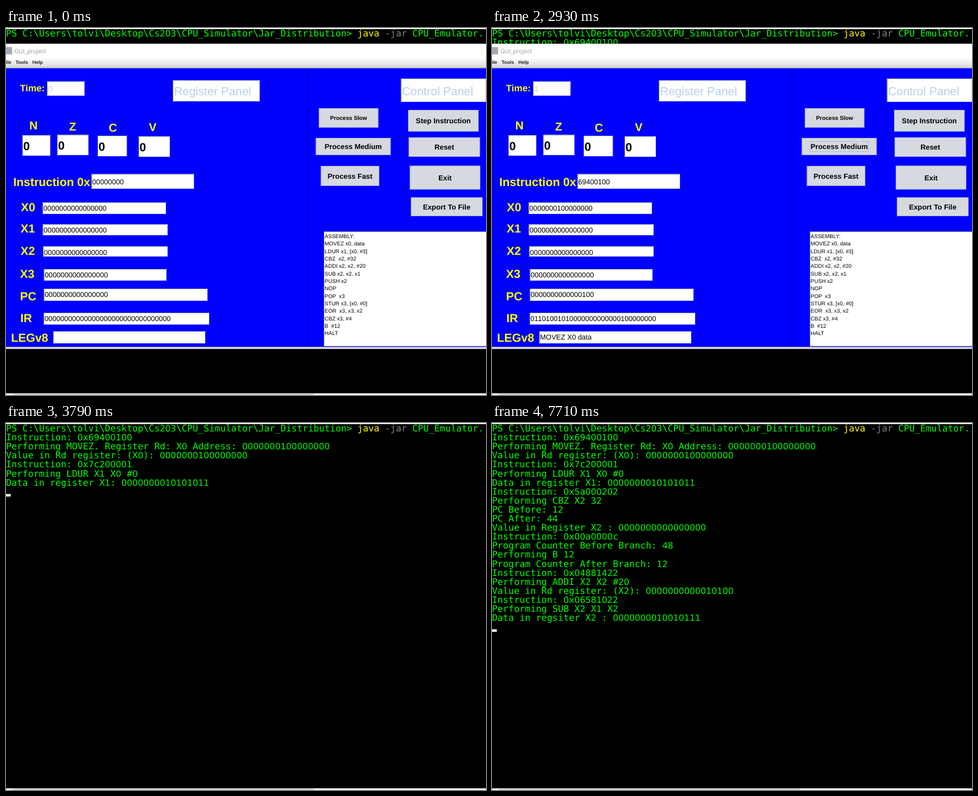
An HTML page that plays this animation: 855x655 px, repeating every 8 s.

```html
<!DOCTYPE html>
<html lang="en">
<head>
<meta charset="utf-8">
<title>CPU simulator</title>
<style>
  html, body { margin: 0; width: 100%; height: 100%; overflow: hidden; background: #000; }
  svg { display: block; width: 855px; height: 655px; }
  text { white-space: pre; text-rendering: geometricPrecision; font-family: "Liberation Sans", Arial, sans-serif; }
  .term text { font: 16.25px "DejaVu Sans Mono", monospace; fill: #00ff00; }
  .term .num { font: 15.37px "DejaVu Sans", sans-serif; }
  .bold { font-weight: bold; }
</style>
</head>
<body>
<svg id="stage" viewBox="0 0 855 655" width="855" height="655"></svg>
<script>
const LOOP = 8000;
const NS = "http://www.w3.org/2000/svg";
const stage = document.getElementById("stage");

function add(parent, tag, attrs = {}, content) {
  const node = document.createElementNS(NS, tag);
  for (const key in attrs) node.setAttribute(key, attrs[key]);
  if (content !== undefined) node.textContent = content;
  parent.appendChild(node);
  return node;
}
const box = (parent, x1, y1, x2, y2, fill) =>
  add(parent, "rect", { x: x1, y: y1, width: x2 - x1, height: y2 - y1, fill });
const label = (parent, x, y, size, content, fill = "#000", cls = "") =>
  add(parent, "text", { x, y, "font-size": size, fill, class: cls }, content);
const show = (node, on) => node.setAttribute("visibility", on ? "visible" : "hidden");

// Terminal
const COL = 9.78, ROW = 16.1;
box(stage, 0, 0, 855, 655, "#f4f4f4");
box(stage, 0, 2, 855, 652, "#000");
box(stage, 12, 653, 548, 655, "#c6c6c6");
const term = add(stage, "g", { class: "term" });

// Digits use the proportional face at the same advance, for an open zero.
function termText(parent, row, col, content, fill) {
  const line = add(parent, "text", { y: 15 + row * ROW });
  for (const run of content.split(/(\d+)/)) {
    if (!run) continue;
    const span = add(line, "tspan", { x: (col * COL).toFixed(2) }, run);
    if (/\d/.test(run)) span.setAttribute("class", "num");
    if (fill) span.style.fill = fill;
    col += run.length;
  }
}
termText(term, 0, 0, "PS C:\\Users\\tolvi\\Desktop\\Cs203\\CPU_Simulator\\Jar_Distribution>");
termText(term, 0, 64, "java", "#ffff00");
termText(term, 0, 69, "-jar", "#808080");
termText(term, 0, 74, "CPU_Emulator.");

const output = [
  [2720, "Instruction: 0x69400100",
    "Performing MOVEZ. Register Rd: X0 Address: 0000000100000000",
    "Value in Rd register: (X0): 0000000100000000"],
  [3790, "Instruction: 0x7c200001",
    "Performing LDUR X1 X0 #0",
    "Data in register X1: 0000000010101011"],
  [4780, "Instruction: 0x5a000202",
    "Performing CBZ X2 32",
    "PC Before: 12",
    "PC After: 44",
    "Value in Register X2 : 0000000000000000"],
  [5780, "Instruction: 0x00a0000c",
    "Program Counter Before Branch: 48",
    "Performing B 12",
    "Program Counter After Branch: 12"],
  [6750, "Instruction: 0x04881422",
    "Performing ADDI X2 X2 #20",
    "Value in Rd register: (X2): 0000000000010100"],
  [7710, "Instruction: 0x06581022",
    "Performing SUB X2 X1 X2",
    "Data in regsiter X2 : 0000000010010111"]
];
let rows = 1;
const blocks = output.map(([at, ...lines]) => {
  const node = add(term, "g");
  lines.forEach(line => termText(node, rows++, 0, line));
  return { at, node, end: rows };
});
const caret = box(term, 0, 0, 8.5, 4.5, "#fff");
const caretOn = [[3480, 4550], [5660, 6620], [7710, LOOP]];

// Simulator window
const win = add(stage, "g");
const defs = add(stage, "defs");
const menuFill = add(defs, "linearGradient", { id: "menu", x2: 0, y2: 1 });
add(menuFill, "stop", { offset: 0, "stop-color": "#fff" });
add(menuFill, "stop", { offset: 1, "stop-color": "#dadada" });

box(win, -7, 28, 1000, 573, "#c4c4c4");
box(win, -7, 28, 1000, 53, "#fff");
box(win, -4, 53, 1000, 70, "url(#menu)");
box(win, -4, 70, 1000, 72, "#b4b8bc");
box(win, -4, 72, 1000, 569, "#0000ff");
box(win, -7, 570.5, 1000, 572, "#dedede");
box(win, 536.5, 72, 537.5, 569, "#0000b8");
box(win, -3, 34, 11, 47, "#a4abb2");
const title = label(win, 15, 45, 10.4, "GUI_project", "#929292");
title.style.fontFamily = '"Open Sans", sans-serif';
[[-5.5, "File"], [17, "Tools"], [47, "Help"]].forEach(([x, name]) =>
  label(win, x, 64.3, 8.6, name, "#222", "bold"));

function field(x1, y1, x2, y2) {
  box(win, x1, y1, x2, y2, "#c8d0e0");
  box(win, x1, y1, x2 - 1, y2 - 1, "#7a8a99");
  box(win, x1 + 1, y1 + 1, x2 - 1, y2 - 1, "#fff");
}
const yellow = (x, y, size, content) => label(win, x, y, size, content, "#ffff00", "bold");

yellow(25, 112.5, 16.6, "Time:");
field(73, 95, 140, 121);
const time = label(win, 75, 113.5, 14.5, "0", "#cfd3dc");

field(297, 93, 452, 131);
label(win, 299.5, 120, 20.9, "Register Panel", "#b8cfe5");
field(703.5, 90, 855, 132);
label(win, 705.5, 119.5, 20.9, "Control Panel", "#b8cfe5");

[["N", 41.5, 181, 29, 191, 79, 228], ["Z", 112.5, 183, 91, 190.5, 147, 227],
 ["C", 183, 184.5, 163, 192, 215.5, 229], ["V", 254.5, 183.5, 236, 193, 292, 230]
].forEach(([name, x, y, x1, y1, x2, y2]) => {
  yellow(x, y, 20.5, name);
  field(x1, y1, x2, y2);
  label(win, x1 + 1.7, y2 - 10, 21, "0", "#000", "bold");
});

const zeros = n => "0".repeat(n);
// name, label x, label baseline, field box, text baseline, value before and after
const registers = [
  ["Instruction 0x", 13, 281.5, 152, 260.5, 335, 287, 278.5, zeros(8), "69400100"],
  ["X0", 26.5, 327, 65, 311, 285, 332, 326, zeros(16), "0000000100000000"],
  ["X1", 26, 364.5, 65.5, 350, 288, 370, 365.2, zeros(16), zeros(16)],
  ["X2", 26, 404.5, 66, 389.5, 288, 408, 404.5, zeros(16), zeros(16)],
  ["X3", 25, 445.5, 67.5, 430, 286, 451, 445, zeros(16), zeros(16)],
  ["PC", 25, 485.5, 67.5, 465, 359, 487, 480.3, zeros(16), "0000000000000100"],
  ["IR", 25.5, 525, 67, 508, 362, 529.5, 523, zeros(32), "01101001010000000000000100000000"],
  ["LEGv8", 9, 559.5, 84, 541, 355, 563, 556, "", "MOVEZ X0 data"]
].map(([name, x, y, x1, y1, x2, y2, base, before, after]) => {
  yellow(x, y, 20.9, name);
  field(x1, y1, x2, y2);
  return { node: label(win, x1 + 1.6, base, 12.63, before), before, after };
});

const buttons = {};
[["Process Slow", 557, 143, 663.5, 178, 10.15], ["Process Medium", 551.5, 196, 685.5, 227],
 ["Process Fast", 560.5, 246, 665, 282], ["Step Instruction", 716, 146, 842, 185],
 ["Reset", 717, 195, 844.5, 230], ["Exit", 719, 245.5, 845, 288.5],
 ["Export To File", 721, 302, 849, 336]
].forEach(([name, x1, y1, x2, y2, size = 12.85]) => {
  const face = box(win, x1 + .5, y1 + .5, x2 - .5, y2 - .5, "#d6d9df");
  face.setAttribute("stroke", "#8f9bc0");
  label(win, (x1 + x2) / 2, (y1 + y2) / 2 + size * .36, size, name, "#000", "bold")
    .setAttribute("text-anchor", "middle");
  buttons[name] = face;
});
const focusRing = box(win, 566.5, 202.5, 670.5, 220.5, "none");
focusRing.setAttribute("stroke", "#a9bfdc");

field(566, 363, 1000, 568);
["ASSEMBLY:", "MOVEZ x0, data", "LDUR x1, [x0, #3]", "CBZ  x2, #32", "ADDI x2, x2, #20",
 "SUB x2, x2, x1", "PUSH x2", "NOP", "POP  x3", "STUR x3, [x0, #0]", "EOR  x3, x3, x2",
 "CBZ x3, #4", "B  #12", "HALT"
].forEach((line, i) => label(win, 567.6, 375 + i * 13.33, 9.65, line));

// Mouse pointer: time, x, y, hovered button
const pointer = add(stage, "path", {
  d: "M0 0V12.2L2.8 9.6L4.8 14L6.8 13.1L4.9 8.9H8.6Z", fill: "#fff", stroke: "#000", "stroke-width": .7
});
const track = [
  [300, 792, 352], [410, 789, 318, "Export To File"], [530, 772, 282, "Exit"],
  [640, 740, 263, "Exit"], [850, 711, 249], [970, 691, 237],
  [1070, 668, 222, "Process Medium"], [1180, 645, 216, "Process Medium"],
  [1290, 634, 213, "Process Medium"], [1410, 630, 212, "Process Medium"],
  [1620, 654, 200, "Process Medium"], [1730, 690, 172], [1840, 735, 135],
  [1950, 780, 95], [2060, 815, 62], [2170, 842, 40], [2280, 900, 30]
];

function render(t) {
  let end = 1;
  for (const block of blocks) {
    const on = t >= block.at;
    show(block.node, on);
    if (on) end = block.end;
  }
  show(caret, caretOn.some(([from, to]) => t >= from && t < to));
  caret.setAttribute("y", 14 + end * ROW);

  const ran = t >= 2720;
  time.textContent = ran ? "1" : "0";
  for (const r of registers) r.node.textContent = ran ? r.after : r.before;

  const shrinking = t >= 3040;
  show(win, t < 3150);
  win.setAttribute("opacity", shrinking ? .36 : 1);
  win.setAttribute("transform", shrinking ? "translate(337.7 240.7) scale(.652)" : "");

  const step = track.filter(k => t >= k[0]).pop();
  show(pointer, step && t < 2280);
  if (step) pointer.setAttribute("transform", `translate(${step[1]} ${step[2]})`);
  for (const name in buttons) {
    const hover = step && step[3] === name;
    buttons[name].setAttribute("stroke", hover ? "#7a8a99" : "#8f9bc0");
    buttons[name].setAttribute("fill", hover && t >= 1290 && t < 1410 ? "#b8cfe5" : "#d6d9df");
  }
  focusRing.setAttribute("stroke-opacity", t >= 1290 ? 1 : 0);
}

const start = performance.now();
function tick() {
  render((performance.now() - start) % LOOP);
  requestAnimationFrame(tick);
}
tick();
</script>
</body>
</html>
```
